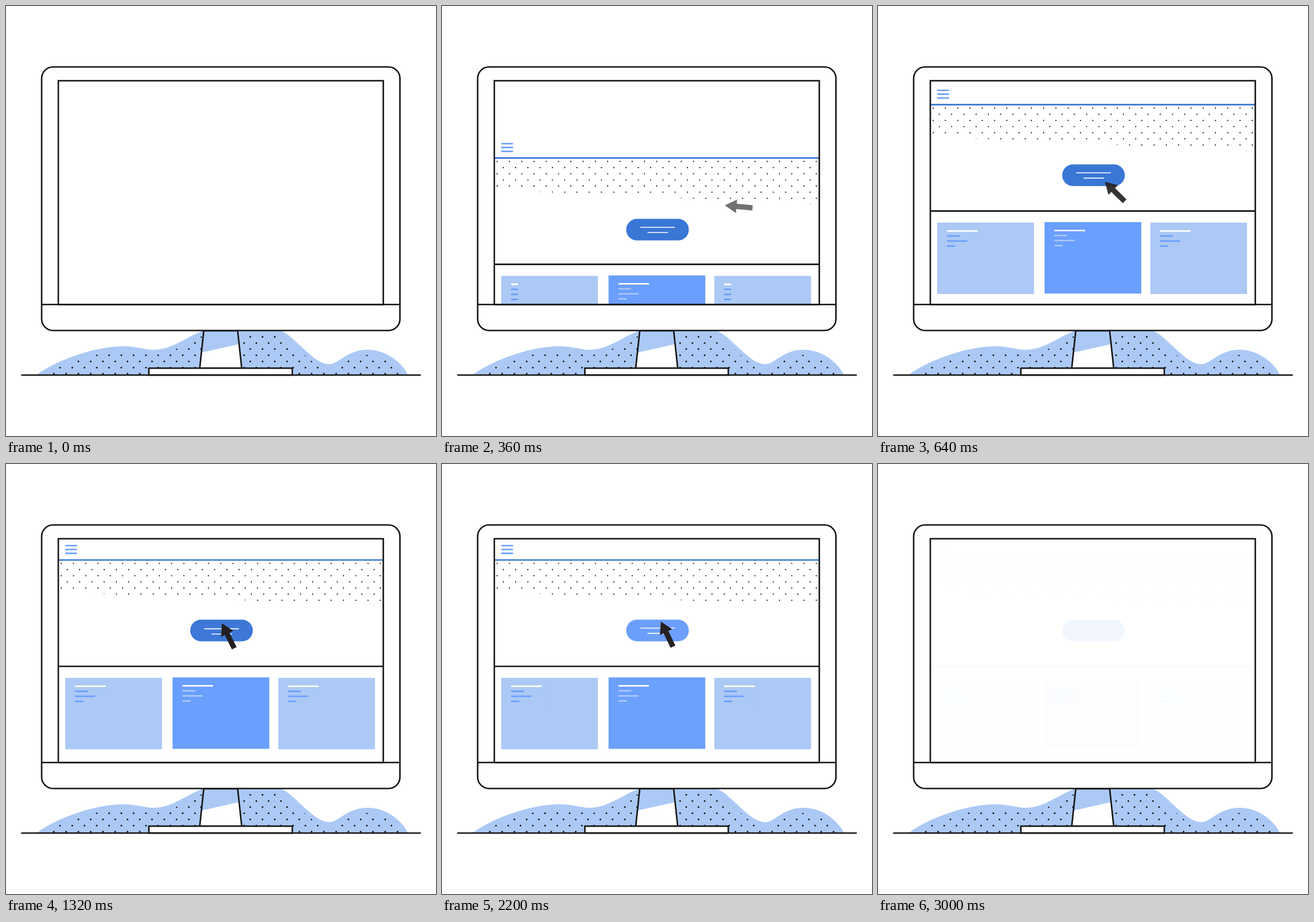
Write an HTML page with a canvas that moves like this. It is 748 px wide and 748 px high and loops after 3.84 s.

```html
<!DOCTYPE html>
<html lang="en">
<head>
<meta charset="utf-8">
<title>Web page on a monitor</title>
<style>
  html, body { margin: 0; width: 100%; height: 100%; overflow: hidden; background: #fff; }
  canvas { display: block; width: 748px; height: 748px; }
</style>
</head>
<body>
<canvas width="748" height="748"></canvas>
<script>
const LOOP = 3840;
const INK = '#141414', PALE = '#acc9f5', BLUE = '#6b9fff', DEEP = '#3a76d4', WHITE = '#fff';
const ctx = document.querySelector('canvas').getContext('2d');

const hills = new Path2D('M54 641 C95 612 160 592 203 592 C230 592 240 598 257 598 ' +
  'C287 598 310 578 342 565 H479 C505 577 535 623 562 623 C580 623 592 598 629 598 C662 598 688 620 699 641 Z');
const stand = new Path2D('M344 565 L337 630 H410 L403 565 Z');
const arrow = new Path2D('M0 0 L20.5 -11.8 V-4.6 H48.5 V4.6 H20.5 V11.8 Z');
const entry = document.createElementNS('http://www.w3.org/2000/svg', 'path');
entry.setAttribute('d', 'M705 245 C650 310 565 351 495 347 C455 344 423 329 396 307 C386 298 382 285 377 275');
const entryLength = entry.getTotalLength();

// Colour of the button over time: [ms, r, g, b]
const buttonKeys = [
  [1300, 58, 118, 214], [1700, 107, 159, 255], [2140, 107, 159, 255],
  [2480, 112, 158, 234], [2700, 205, 222, 252], [3000, 241, 246, 255]
];

const clamp = x => Math.min(1, Math.max(0, x));
const progress = (t, start, duration) => clamp((t - start) / duration);
const easeOut = x => 1 - (1 - x) ** 2;

function buttonColour(t) {
  let i = 0;
  while (i < buttonKeys.length - 2 && t > buttonKeys[i + 1][0]) i++;
  const [a, b] = [buttonKeys[i], buttonKeys[i + 1]];
  const k = progress(t, a[0], b[0] - a[0]);
  return `rgb(${[1, 2, 3].map(c => Math.round(a[c] + (b[c] - a[c]) * k))})`;
}

function line(x1, y1, x2, y2, colour, width = 2.6, cap = 'round') {
  ctx.strokeStyle = colour;
  ctx.lineWidth = width;
  ctx.lineCap = cap;
  ctx.beginPath();
  ctx.moveTo(x1, y1);
  ctx.lineTo(x2, y2);
  ctx.stroke();
}

function box(x, y, w, h, fill) {
  ctx.fillStyle = fill;
  ctx.fillRect(x, y, w, h);
}

// Staggered dot grid
function dots(x0, y0, columns, rows, radius) {
  ctx.fillStyle = INK;
  ctx.beginPath();
  for (let r = 0; r < rows; r++) {
    for (let c = 0; c < columns; c++) {
      const x = x0 + (c + (r % 2) / 2) * 21.35, y = y0 + r * 10.68;
      ctx.moveTo(x + radius, y);
      ctx.arc(x, y, radius, 0, 7);
    }
  }
  ctx.fill();
}

function card(x, y, fill, textColour, reveal) {
  box(x, y, 168.3, 124.3, fill);
  [51, 20, 33, 12].forEach((length, i) => {
    const ly = y + 14.6 + i * 8.75;
    line(x + 18.3, ly, x + 18.3 + length, ly, i ? textColour : WHITE, 2.7);
  });
  if (reveal !== undefined) {
    const left = x + 15 + 59.5 * reveal;
    box(left, y + 11, x + 78 - left, 36.5, fill);
  }
}

function page(t, alpha) {
  const rest = (1 - progress(t, 0, 720)) ** 2;
  const press = Math.sin(Math.PI * progress(t, 1290, 420));

  ctx.save();
  ctx.translate(0, 392 * rest);
  ctx.globalAlpha = alpha;
  for (const y of [142, 148.7, 155.4]) line(104, y, 122.5, y, BLUE);
  line(91, 167, 656, 167, DEEP, 2.7, 'butt');
  line(91, 352, 656, 352, INK, 2.7, 'butt');

  const reveal = easeOut(progress(t, 320, 320));
  card(103, 372, PALE, BLUE, reveal);
  card(289.7, 371.2, BLUE, PALE);
  card(473.6, 372, PALE, BLUE, reveal);

  ctx.beginPath();
  ctx.moveTo(91, 168);
  ctx.lineTo(656, 168);
  ctx.lineTo(656, 247.7);
  ctx.lineTo(91, 222.4);
  ctx.clip();
  dots(96, 173, 27, 8, 1.1);
  ctx.restore();

  ctx.save();
  ctx.translate(0, 400 * rest);
  ctx.fillStyle = buttonColour(t);
  ctx.beginPath();
  ctx.roundRect(320.4, 270.8, 109, 37.6, 18.8);
  ctx.fill();
  ctx.globalAlpha = alpha;
  line(345.5, 285.5 + 5 * press, 404.5, 285.5 + 5 * press, WHITE, 1.6);
  line(358, 294.6 + 5 * press, 392.5, 294.6 + 5 * press, WHITE, 1.6);
  ctx.restore();
}

function pointer(t, leave) {
  const enter = easeOut(progress(t, 0, 920));
  const press = Math.sin(Math.PI * progress(t, 1290, 420));
  const s = enter * entryLength;
  const tip = entry.getPointAtLength(s);
  const behind = entry.getPointAtLength(Math.max(0, s - 1));
  const ahead = entry.getPointAtLength(Math.min(entryLength, s + 1));
  const angle = Math.atan2(behind.y - ahead.y, behind.x - ahead.x) + leave * 0.62;

  ctx.save();
  ctx.globalAlpha = enter * (1 - leave);
  ctx.translate(tip.x - 6 * press + 302 * leave, tip.y + 9 * press - 79 * leave);
  ctx.rotate(angle);
  ctx.fillStyle = '#231f20';
  ctx.fill(arrow);
  ctx.restore();
}

function background() {
  box(0, 0, 748, 748, WHITE);
  ctx.fillStyle = PALE;
  ctx.fill(hills);

  ctx.save();
  ctx.translate(0, 9);
  ctx.clip(hills);
  ctx.translate(0, -9);
  dots(51.2, 564.8, 32, 8, 1.5);
  ctx.restore();

  ctx.save();
  ctx.clip(stand);
  box(330, 560, 90, 80, WHITE);
  ctx.fillStyle = PALE;
  ctx.fill(new Path2D('M330 560 H420 V585 L330 605 Z'));
  ctx.restore();

  ctx.strokeStyle = INK;
  ctx.lineWidth = 2.6;
  ctx.stroke(stand);
  box(248.5, 630, 249.5, 12, WHITE);
  ctx.strokeRect(248.5, 630, 249.5, 12);
  line(27.5, 642, 720.5, 642, INK);
}

function monitor() {
  ctx.strokeStyle = INK;
  ctx.lineWidth = 2.6;
  ctx.beginPath();
  ctx.roundRect(62, 106, 623.3, 458.5, 20);
  ctx.stroke();
  ctx.strokeRect(91, 130, 565.3, 389.2);
  line(62, 519.2, 685.3, 519.2, INK, 2.6, 'butt');
}

function draw(t) {
  background();
  ctx.beginPath();
  ctx.roundRect(62, 106, 623.3, 458.5, 20);
  ctx.fillStyle = WHITE;
  ctx.fill();

  const leave = progress(t, 2140, 550) ** 2;
  ctx.save();
  ctx.beginPath();
  ctx.rect(91, 130, 565.3, 389.2);
  ctx.clip();
  page(t, Math.max(0.025, 1 - leave));
  pointer(t, leave);
  ctx.restore();
  monitor();
}

const begin = performance.now();
function tick() {
  draw((performance.now() - begin) % LOOP);
  requestAnimationFrame(tick);
}
tick();
</script>
</body>
</html>
```
